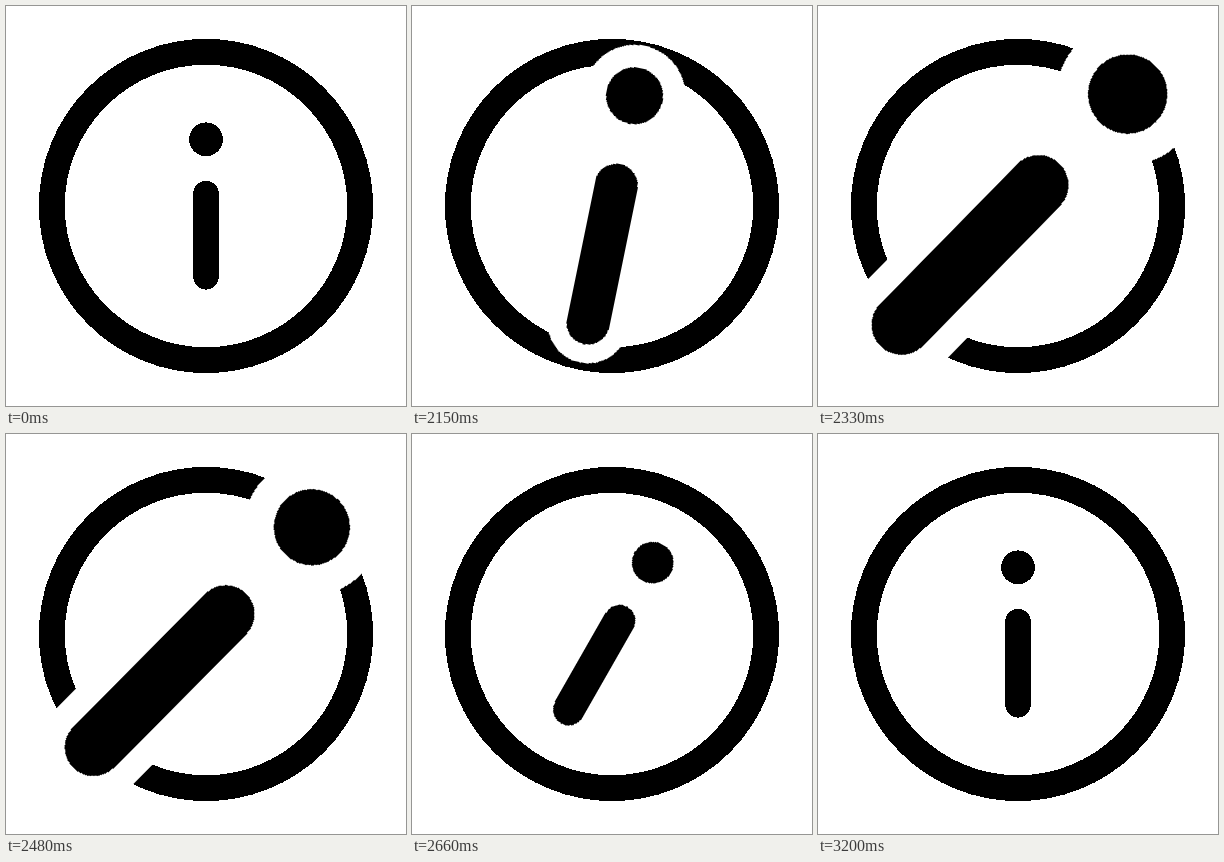
An HTML page for the animation above (3.23 s loop, 400x400 px).

```html
<!DOCTYPE html>
<html lang="en">
<head>
<meta charset="utf-8">
<title>Info icon</title>
<style>
  html, body { margin: 0; width: 100%; height: 100%; overflow: hidden; background: #fff; }
  svg { display: block; width: 100vw; height: 100vh; shape-rendering: crispEdges; }
  .ring, .bar { fill: none; stroke: #000; stroke-linecap: round; }
  .ring { stroke-width: 25.9; }
  .bar { stroke-width: 25.5; }
  .gap { fill: #fff; stroke: #fff; stroke-width: 47.9; stroke-linecap: round; }
  .gap circle { stroke: none; }

  .grow, .spin { transform-origin: 200px 200px; }
  .grow { animation: grow 3230ms linear infinite; }
  .spin { animation: spin 3230ms linear infinite; }

  /* rest 2 s, swell, shrink below size, settle */
  @keyframes grow {
    0%     { transform: scale(1); }
    61.92% { transform: scale(1); animation-timing-function: cubic-bezier(.65, 0, .35, 1); }
    71.21% { transform: scale(2.35); }
    73.07% { transform: scale(2.35); animation-timing-function: cubic-bezier(.65, 0, .35, 1); }
    88.95% { transform: scale(.8); animation-timing-function: cubic-bezier(.65, 0, .35, 1); }
    99.07%, 100% { transform: scale(1); }
  }
  /* the turn trails the scale a little */
  @keyframes spin {
    0%     { transform: rotate(0deg); }
    61.92% { transform: rotate(0deg); animation-timing-function: cubic-bezier(.65, 0, .35, 1); }
    73.53% { transform: rotate(45deg); }
    75.85% { transform: rotate(45deg); animation-timing-function: cubic-bezier(.65, 0, .65, 1); }
    90.31% { transform: rotate(-20deg); animation-timing-function: cubic-bezier(.65, 0, .35, 1); }
    99.07%, 100% { transform: rotate(0deg); }
  }
</style>
</head>
<body>
<svg viewBox="0 0 400 400">
  <circle class="ring" cx="200" cy="200" r="154.17"/>
  <g class="grow">
    <g class="spin">
      <g class="gap">
        <circle cx="200" cy="133.33" r="30.2"/>
        <path d="M200 187.5V270.83"/>
      </g>
      <circle cx="200" cy="133.33" r="16.9"/>
      <path class="bar" d="M200 187.5V270.83"/>
    </g>
  </g>
</svg>
</body>
</html>
```
